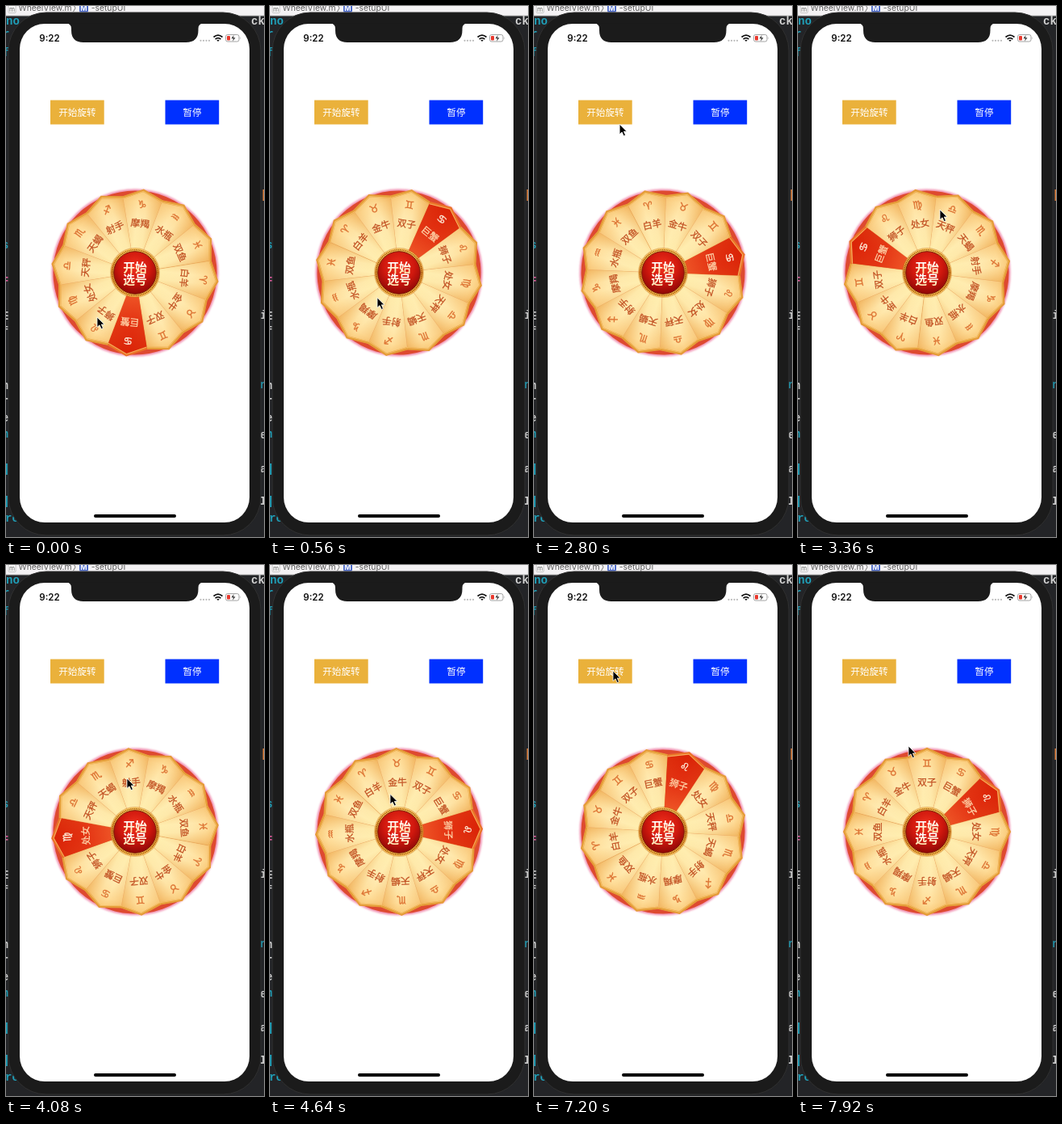
Animation of 320 by 657 pixels, one loop 8 s. Source, as an HTML page:

```html
<!DOCTYPE html>
<html lang="zh">
<head>
<meta charset="utf-8">
<title>Wheel</title>
<style>
html, body { margin: 0; width: 100%; height: 100%; overflow: hidden; background: #232427; }
svg { display: block; width: 320px; height: 657px; }
text { font-family: "Noto Sans CJK SC", "Noto Sans CJK", "Noto Sans", sans-serif; text-anchor: middle; }
.ui { font-family: Inter, Roboto, sans-serif; }
.code { font: 700 14px "Liberation Mono", "DejaVu Sans Mono", monospace; text-anchor: start; }
.sign { font: 13px "DejaVu Sans", sans-serif; fill: #dd7434; stroke: #dd7434; stroke-width: .4; }
.name { font-size: 11.7px; fill: #c04e20; stroke: #c04e20; stroke-width: .25; }
.on .sign { fill: #fff3e0; stroke: #fff3e0; }
.on .name { fill: #ffd9ae; stroke: #ffd9ae; }
.on .leaf { fill: url(#hot); }
.on .fold { opacity: .15; }
.on .rim { stroke: #ea7428; }
</style>
</head>
<body>
<svg viewBox="0 0 320 657" xmlns="http://www.w3.org/2000/svg">
  <defs>
    <radialGradient id="cream" gradientUnits="userSpaceOnUse" cx="0" cy="0" r="104">
      <stop offset=".28" stop-color="#ffeeaf"/><stop offset=".65" stop-color="#ffeab0"/>
      <stop offset=".85" stop-color="#ffdf9c"/><stop offset="1" stop-color="#f8c673"/>
    </radialGradient>
    <radialGradient id="hot" gradientUnits="userSpaceOnUse" cx="0" cy="0" r="104">
      <stop offset=".27" stop-color="#ee5426"/><stop offset=".6" stop-color="#e33212"/>
      <stop offset="1" stop-color="#d92206"/>
    </radialGradient>
    <linearGradient id="crease" gradientUnits="userSpaceOnUse" x1="-25" x2="25">
      <stop offset="0" stop-color="#eda548" stop-opacity=".4"/>
      <stop offset=".4" stop-color="#eda548" stop-opacity="0"/>
      <stop offset=".6" stop-color="#eda548" stop-opacity=".05"/>
      <stop offset="1" stop-color="#e89a3a" stop-opacity=".6"/>
    </linearGradient>
    <radialGradient id="knob" cx=".5" cy=".35" r=".65">
      <stop offset="0" stop-color="#f0321e"/><stop offset=".55" stop-color="#d0180e"/>
      <stop offset="1" stop-color="#8e0806"/>
    </radialGradient>
    <linearGradient id="gold" x2="0" y2="1">
      <stop offset="0" stop-color="#f9c95a"/><stop offset=".5" stop-color="#d98c28"/>
      <stop offset="1" stop-color="#f5bb48"/>
    </linearGradient>
    <linearGradient id="ink" x2="0" y2="1">
      <stop offset=".3" stop-color="#fff"/><stop offset="1" stop-color="#ffe3a0"/>
    </linearGradient>
    <filter id="soft" x="-10%" y="-10%" width="120%" height="120%"><feGaussianBlur stdDeviation="1.3"/></filter>
  </defs>

  <rect width="320" height="657" fill="#232427"/>
  <g id="code"></g>
  <rect width="320" height="12" fill="#f4f2f4"/>
  <rect y="11.5" width="320" height="1" fill="#bdbdbd"/>
  <rect x="3" y="-4" width="9" height="12.5" rx="1" fill="#fff" stroke="#b5b5b5" stroke-width=".8"/>
  <g font-size="10.3" fill="#5b5b5b">
    <text class="ui" x="7.5" y="7" font-size="8">m</text>
    <text class="ui" x="48.5" y="6.3">WheelView.m</text>
    <path d="M83.500 -2L86 2.500L83.500 7" fill="none" stroke="#777"/>
    <rect x="91" y="-3" width="11" height="10.5" rx="1.5" fill="#4a68c8"/>
    <text class="ui" x="96.5" y="6.3" font-size="9" font-weight="700" fill="#fff">M</text>
    <text class="ui" x="127" y="6.3">-setupUI</text>
  </g>

  <rect x="3" y="8" width="313" height="647" rx="47" fill="#1b1b1b" stroke="#303030" stroke-width="1"/>
  <rect x="17" y="22" width="285" height="617" rx="31" fill="#fff"/>
  <path d="M75 21.500Q81 22 81 28V30Q81 45 96 45H223Q238.500 45 238.500 30V28Q238.500 22 244.500 21.500Z" fill="#1b1b1b"/>

  <text class="ui" x="54" y="44" font-size="11.5" font-weight="600" fill="#111">9:22</text>
  <g fill="#b8b8b8" id="dots"></g>
  <g fill="none" stroke="#111" stroke-width="1.7">
    <path d="M257.500 38.500Q263 33.800 268.500 38.500M259.600 41Q263 38.200 266.400 41"/>
    <path d="M261.300 42.300L263 44L264.700 42.300Q263 41 261.300 42.300Z" fill="#111" stroke="none"/>
  </g>
  <rect x="272.500" y="35.500" width="16.500" height="8.500" rx="2.300" fill="#fff" stroke="#999" stroke-width=".9"/>
  <rect x="274" y="37" width="4" height="5.500" rx="1" fill="#e8382d"/>
  <path d="M282.500 36L279.500 40.300H282L281 43.800L284.500 39.200H282Z" fill="#333"/>
  <path d="M290.300 38.200Q291.600 39.700 290.300 41.300Z" fill="#999"/>

  <rect x="55" y="116.500" width="66.700" height="30" fill="#eab13b"/>
  <rect x="197.500" y="116.500" width="66.700" height="30" fill="#0030ff"/>
  <g fill="#fff" font-size="11.600">
    <text x="88.400" y="136">开始旋转</text>
    <text x="230.900" y="136">暂停</text>
  </g>
  <rect x="109" y="629" width="102" height="4" rx="2" fill="#000"/>

  <g transform="translate(160 330)">
    <g id="wheel">
      <circle r="103.500" fill="#f08fb0" filter="url(#soft)"/>
      <circle r="101.500" fill="#de4a30"/>
    </g>
    <circle r="31" fill="#c46a18" opacity=".4"/>
    <circle r="30" fill="url(#gold)"/>
    <circle r="28.300" fill="none" stroke="#8b3c0c" stroke-width="1.400" stroke-dasharray="1 1.200"/>
    <circle r="26.300" fill="url(#knob)" stroke="#7a1a08" stroke-width="1"/>
    <g font-size="14.800" font-weight="700" fill="url(#ink)">
      <text y="-1.400">开始</text>
      <text y="14.300">选号</text>
    </g>
  </g>
  <path id="cursor" d="M0 0V12.500L3 9.800L5.200 14.600L7.400 13.600L5.300 9H9Z" fill="#000" stroke="#fff" stroke-width=".8"/>
</svg>
<script>
const LOOP = 8000, STEP = 80;
const NAMES = "白羊 金牛 双子 巨蟹 狮子 处女 天秤 天蝎 射手 摩羯 水瓶 双鱼".split(" ");
const $ = id => document.getElementById(id);

function add(parent, tag, attrs, text) {
  const el = document.createElementNS("http://www.w3.org/2000/svg", tag);
  for (const k in attrs) el.setAttribute(k, attrs[k]);
  if (text) el.textContent = text;
  parent.append(el);
  return el;
}

// Editor text peeking out around the phone: x, baseline, text, colour
const TEAL = "#1f9fb8", GREY = "#d0d0d0";
[[0, 23, "no", TEAL], [-4, 39, "r", TEAL], [-4, 62, "f", TEAL], [-5, 300, "s", TEAL],
 [-5, 343, "=", "#e05a9c"], [-4, 388, "E", GREY], [-5, 407, "f", GREY], [-5, 474, "n", GREY],
 [-5, 493, "r", GREY], [-5, 514, "e", GREY], [-5, 534, "n", TEAL], [-4, 577, "]", TEAL],
 [-4, 617, "]", TEAL], [-1, 638, "ro", TEAL], [304, 23, "ck", GREY], [316, 238, "[", "#e0813c"],
 [315, 387, "i", GREY], [315, 473, "n", TEAL], [315, 535, "e", GREY], [315, 577, "a", GREY],
 [315, 617, "I", GREY]
].forEach(([x, y, s, fill]) => add($("code"), "text", { class: "code", x, y, fill }, s));

for (let i = 0; i < 4; i++) add($("dots"), "circle", { cx: 241.5 + i * 3.5, cy: 42.8, r: 1.1 });

const wheel = $("wheel");
const polar = (deg, r) => {
  const a = deg * Math.PI / 180;
  return (r * Math.sin(a)).toFixed(2) + " " + (-r * Math.cos(a)).toFixed(2);
};
const leaves = NAMES.map((name, i) => {
  const g = add(wheel, "g", { transform: `rotate(${i * 30})` });
  const edge = r => `${polar(-15, r - 8)}L${polar(0, r)}L${polar(15, r - 8)}`;
  const shape = `M0 0L${edge(103.5)}Z`;
  add(g, "path", { class: "leaf", d: shape, fill: "url(#cream)" });
  add(g, "path", { class: "fold", d: shape, fill: "url(#crease)" });
  add(g, "path", { d: `M0 0L${polar(15, 95)}`, stroke: "#e0a046", "stroke-width": .7, opacity: .6 });
  add(g, "path", { class: "rim", d: "M" + edge(102.3), fill: "none", stroke: "#e59c38", "stroke-width": 3.4 });
  add(g, "path", { d: "M" + edge(101.2), fill: "none", stroke: "#ffd988", "stroke-width": .8, opacity: .7 });
  add(g, "text", { class: "sign", y: -80.3 }, String.fromCharCode(0x2648 + i) + "\uFE0E");
  add(g, "text", { class: "name", y: -57 }, name);
  return g;
});

// Time, wheel angle
const TURN = [[0, 96], [1200, 552], [1500, 600], [2520, 600], [3360, 922], [4080, 1195.5],
  [5040, 1560], [5500, 1680], [6880, 1680], [7200, 1698.5], [7920, 1740], [8000, 1744.6]];
// Time, pointer x, pointer y
const PATH = [[0, 113, 385], [240, 113, 385], [960, 161, 327], [1900, 161, 327], [2400, 96, 131],
  [2640, 96, 131], [3360, 176, 252], [3600, 172, 256], [4080, 150, 264], [4440, 150, 264],
  [4960, 147, 323], [6080, 147, 323], [6720, 98, 131], [7280, 98, 131], [7920, 137, 224], [8000, 139, 232]];
// Time, chosen sign
const PICK = [[0, 3], [3440, 5], [4400, 4]];

function at(table, t, ease = k => k) {
  let i = 0;
  while (i < table.length - 2 && t >= table[i + 1][0]) i++;
  const a = table[i], b = table[i + 1];
  const k = ease((t - a[0]) / (b[0] - a[0]));
  return a.slice(1).map((v, j) => v + (b[j + 1] - v) * k);
}
const smooth = k => k * k * (3 - 2 * k);

function draw(now) {
  const t = Math.floor(now % LOOP / STEP) * STEP;
  wheel.setAttribute("transform", `rotate(${at(TURN, t)[0] % 360})`);
  $("cursor").setAttribute("transform", `translate(${at(PATH, t, smooth)})`);
  const pick = PICK.filter(p => p[0] <= t).pop()[1];
  leaves.forEach((g, i) => g.classList.toggle("on", i === pick));
}

const start = performance.now();
function tick() {
  draw(performance.now() - start);
  requestAnimationFrame(tick);
}
tick();
</script>
</body>
</html>
```
